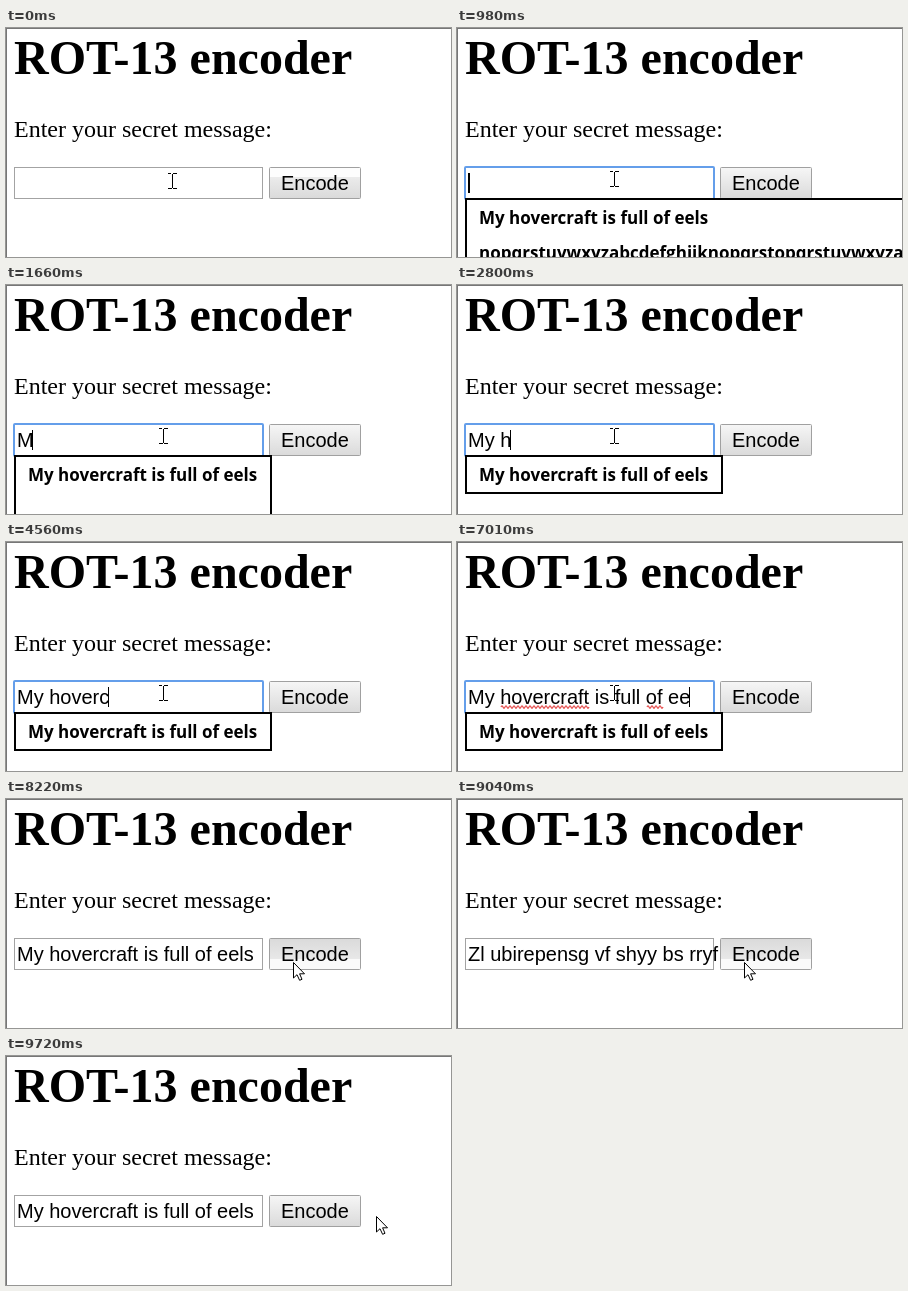
An HTML page that plays this animation: 445 by 229 pixels, repeating every 9.82 s.

```html
<!DOCTYPE html>
<html lang="en">
<head>
<meta charset="utf-8">
<title>ROT-13 encoder</title>
<style>
  html, body { margin: 0; width: 100%; height: 100%; overflow: hidden; background: #fff; }
  svg { display: block; }
  text { white-space: pre; }
  .serif { font-family: "Liberation Serif", "Times New Roman", serif; }
  .sans { font: 20px "Liberation Sans", Arial, sans-serif; }
  .item { font: bold 17px "Open Sans", "Noto Sans", sans-serif; }
</style>
</head>
<body>
<svg width="445" height="229" viewBox="0 0 445 229">
  <defs>
    <linearGradient id="idle" x2="0" y2="1">
      <stop offset="0" stop-color="#f6f6f6"/><stop offset="1" stop-color="#dadada"/>
    </linearGradient>
    <linearGradient id="fresh" x2="0" y2="1">
      <stop offset=".32" stop-color="#fdfdfd"/><stop offset=".32" stop-color="#ebebeb"/>
      <stop offset="1" stop-color="#dadada"/>
    </linearGradient>
    <linearGradient id="pressed" x2="0" y2="1">
      <stop offset="0" stop-color="#dadada"/><stop offset=".66" stop-color="#e8e8e8"/>
      <stop offset=".66" stop-color="#fafafa"/>
    </linearGradient>
  </defs>
  <path d="M0 .5H445M.5 0V229" stroke="#777"/>
  <text class="serif" x="8" y="46" font-size="48" font-weight="bold">ROT-13 encoder</text>
  <text class="serif" x="8" y="109" font-size="24">Enter your secret message:</text>

  <rect id="field" fill="#fff"/>
  <text id="value" class="sans" x="11" y="162"></text>
  <g fill="none" stroke="#e23a3a" stroke-width="1.1">
    <path id="wave1"/><path id="wave2"/>
  </g>
  <rect id="caret" y="145" height="20"/>

  <rect id="button" x="263.5" y="139.5" width="91" height="31" rx="1" stroke="#a0a0a0"/>
  <text class="sans" x="275" y="162">Encode</text>

  <g id="popup">
    <rect id="list" x="9" y="171" fill="#fff" stroke="#000" stroke-width="2"/>
    <text class="item" x="22" y="196">My hovercraft is full of eels</text>
    <text id="second" class="item" x="22" y="231">nopqrstuvwxyzabcdefghijknopqrstopqrstuvwxyzabcd</text>
  </g>

  <path id="beam" d="M-4 .5H-1M1 .5H5M.5 1V15M-4 15.5H0M1 15.5H5" stroke="#000" fill="none"/>
  <path id="arrow" d="M.5 .5V16L4 12.7L6.6 18.3L9 17.3L6.6 11.8H11.5Z" fill="#fff" stroke="#000"/>
</svg>
<script>
const LOOP = 9820;
const MESSAGE = "My hovercraft is full of eels";
const $ = id => document.getElementById(id);
const set = (id, attrs) => {
  for (const key in attrs) $(id).setAttribute(key, attrs[key]);
};
const show = (id, on) => set(id, { visibility: on ? "visible" : "hidden" });

// [time, number of characters typed]
const typing = [
  [0, 0], [1530, 1], [1960, 2], [2270, 3], [2800, 4], [2950, 5], [3110, 6], [3260, 8],
  [3630, 9], [3910, 8], [4560, 9], [4830, 11], [5140, 13], [5290, 14], [5440, 15],
  [5590, 17], [5900, 18], [6060, 19], [6200, 20], [6330, 21], [6460, 22], [6600, 24],
  [6730, 26], [7010, 27], [7130, 28], [7280, 29]
];

// [time, shape, x, y]
const pointer = [
  [0, "beam", 166, 145], [120, ""], [430, "arrow", 212, 189], [570, "beam", 185, 164],
  [700, "beam", 157, 143], [7790, "beam", 196, 147], [7930, "beam", 243, 150],
  [8080, "arrow", 287, 163], [9570, "arrow", 325, 163], [9720, "arrow", 370, 160]
];

const latest = (list, t) => list.findLast(entry => entry[0] <= t);
const within = (t, from, to) => t >= from && t < to;

const rot13 = s => s.replace(/[a-z]/gi, c => {
  const base = c < "a" ? 65 : 97;
  return String.fromCharCode((c.charCodeAt(0) - base + 13) % 26 + base);
});

function wave(x, end) {
  let d = `M${x} 165`;
  for (; x < end; x += 4) d += "q1 -2.6 2 0t2 0";
  return d;
}

function render(t) {
  const focused = within(t, 980, 8220);
  const count = latest(typing, t)[1];
  let text = MESSAGE.slice(0, count);
  if (within(t, 3630, 3910)) text = text.slice(0, -1) + "v";
  if (within(t, 8370, 9170)) text = rot13(text);
  $("value").textContent = text;

  set("field", focused
    ? { x: 8, y: 139, width: 249, height: 32, rx: 1, stroke: "#649eea", "stroke-width": 2 }
    : { x: 8.5, y: 139.5, width: 248, height: 31, rx: 0, stroke: "#a3a3a3", "stroke-width": 1 });
  show("wave1", focused && count >= 14);
  show("wave2", focused && count >= 25);

  const width = count ? $("value").getComputedTextLength() : 0;
  set("caret", { x: count ? Math.floor(10 + width) : 11, width: count ? 1 : 2 });
  show("caret", focused && !within(t, 4030, 4560));

  show("popup", focused);
  set("list", { width: t < 1660 ? 500 : 256, height: t < 1960 ? 100 : 37 });
  show("second", focused && t < 1660);

  const down = within(t, 8220, 8370) || within(t, 9040, 9170);
  set("button", { fill: `url(#${down ? "pressed" : t < 980 ? "fresh" : "idle"})` });

  const [, shape, x, y] = latest(pointer, t);
  for (const id of ["beam", "arrow"]) show(id, id === shape);
  if (shape) set(shape, { transform: `translate(${x} ${y})` });
}

set("wave1", { d: wave(44, 132) });
set("wave2", { d: wave(190, 206) });

const start = performance.now();
function tick() {
  render((performance.now() - start) % LOOP);
  requestAnimationFrame(tick);
}
tick();
</script>
</body>
</html>
```
